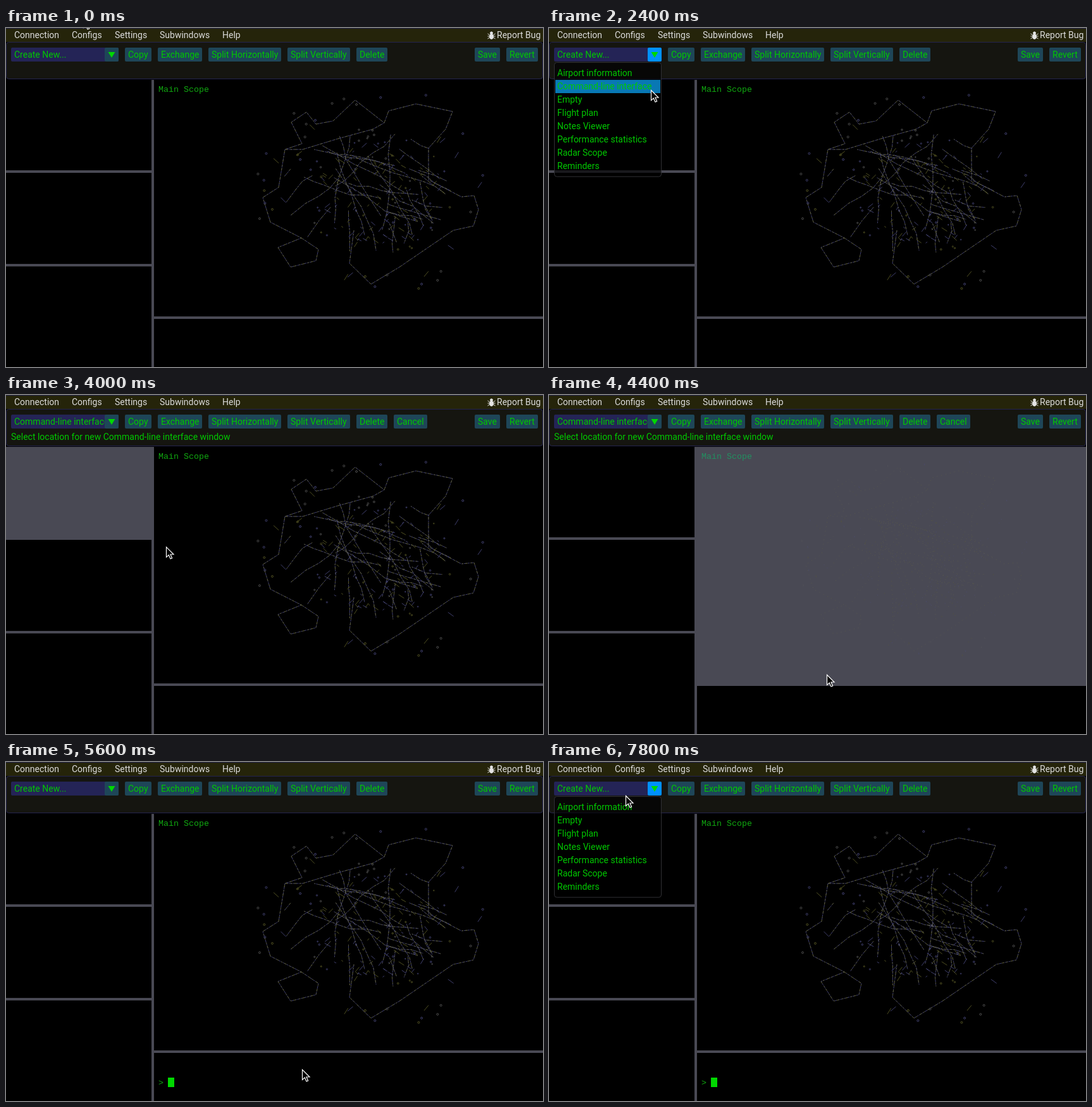
These frames come from a looping animation (849x536 px, 8000 ms). An HTML page:

```html
<!DOCTYPE html>
<html lang="en">
<head>
<meta charset="utf-8">
<title>Subwindow editor</title>
<style>
html, body { margin: 0; width: 100%; height: 100%; overflow: hidden; background: #000; }
svg { display: block; width: 100%; height: 100%; }
text { font: 14px Roboto, sans-serif; fill: #00c800; white-space: pre; }
.menu { fill: #dcdcdc; }
.mono { font: 13.33px "Liberation Mono", monospace; fill: #10a810; }
.map * { fill: none; stroke-width: 0.8; }
.lit .map { opacity: 0.7; }
.lit .map * { stroke-dasharray: 1 6; }
.lit .mono { fill: #229060; }
</style>
</head>
<body>
<svg id="stage" viewBox="0 0 849 536" preserveAspectRatio="none"></svg>
<script>
const NS = 'http://www.w3.org/2000/svg';
const stage = document.getElementById('stage');
const LOOP = 8000, STEP = 200;
const GREY = '#494954', NAVY = '#242456', TEAL = '#1e4658', SKY = '#0090ff', GREEN = '#00d800';
const OLIVE = '#62622a', BLUE = '#505088';

function el(parent, tag, attrs = {}, text) {
  const node = document.createElementNS(NS, tag);
  for (const key in attrs) node.setAttribute(key, attrs[key]);
  if (text !== undefined) node.textContent = text;
  parent.appendChild(node);
  return node;
}
const group = (parent = stage, cls = '') => el(parent, 'g', { class: cls });
const rect = (parent, x, y, width, height, fill, rx = 0) =>
  el(parent, 'rect', { x, y, width, height, fill, rx });
const label = (parent, x, y, text, cls = '') => el(parent, 'text', { x, y, class: cls }, text);
const widthOf = node => Math.round(node.getComputedTextLength());
const show = (node, on) => node.setAttribute('visibility', on ? 'visible' : 'hidden');

function random(seed) {
  return () => (seed = (seed * 16807) % 2147483647) / 2147483647;
}

// Panes
const LEFT = 230, TOP = 82, BAR = 4;
rect(stage, LEFT, TOP, BAR, 454, GREY);
for (const y of [225, 373]) rect(stage, 0, y, LEFT, BAR, GREY);
rect(stage, LEFT, 456, 619, BAR, GREY);

const hover = {
  left: rect(stage, 0, TOP, LEFT + BAR, 147, GREY),
  scope: rect(stage, LEFT, TOP, 619, 378, GREY),
  bottom: rect(stage, LEFT, 456, 619, 80, GREY)
};

// Radar map: a few borders, the rest scattered by rule
const scope = group();
const map = group(scope, 'map');
const rnd = random(4711);
const between = (a, b) => a + rnd() * (b - a);
const pick = list => list[Math.floor(rnd() * list.length)];

function trace(points) {
  const shift = between(0, 20);
  el(map, 'polyline', { points, stroke: BLUE, 'stroke-dasharray': '5 1 3 1', 'stroke-dashoffset': shift });
  el(map, 'polyline', { points, stroke: OLIVE, 'stroke-dasharray': '4 5 2 3', 'stroke-dashoffset': shift });
}
[
  'M475,133 451,149 468,183 441,192 431,252 406,268 418,307 467,332 430,347 450,378 490,368 494,350 467,332',
  '441,192 469,192 525,175 580,160 598,150 552,114 517,147 490,152 475,133',
  '598,150 605,131 648,120 706,132 695,160 668,190 668,240 720,267 740,265 747,287 739,313 707,320 622,378 577,405 543,372 550,320'
].forEach(points => trace(points.replace('M', '')));

const inside = (x, y) => Math.hypot((x - 570) / 135, (y - 260) / 105) < 1;

// Routes keep their heading with small kinks until they leave the area
function route(x, y, heading) {
  const points = [];
  for (let i = 0; i < 7 && inside(x, y); i++) {
    points.push(`${x.toFixed(1)},${y.toFixed(1)}`);
    const len = between(14, 32), dir = heading + between(-0.25, 0.25);
    x += Math.cos(dir) * len;
    y += Math.sin(dir) * len;
  }
  if (points.length > 1) trace(points.join(' '));
}
const headings = [0.2, 0.5, 1.2, 1.7, 2.4];
for (let i = 0; i < 42; i++) route(between(440, 670), between(160, 310), headings[i % 5]);

function dash(x, y, len) {
  const dir = pick([0.5, 2.1]) + between(0, 0.4);
  el(map, 'line', {
    x1: x, y1: y, x2: x + Math.cos(dir) * len, y2: y + Math.sin(dir) * len, stroke: pick([OLIVE, BLUE])
  });
}
const fix = (cx, cy, r) => el(map, 'circle', { cx, cy, r, stroke: pick([OLIVE, BLUE, '#606060']) });

function scatter(count, near, far, put) {
  for (let i = 0; i < count; i++) {
    const a = between(0, 2 * Math.PI), r = Math.sqrt(between(near * near, far * far));
    put(590 + Math.cos(a) * r * 100, 260 + Math.sin(a) * r * 86);
  }
}
scatter(110, 0, 1, (x, y) => dash(x, y, between(3, 11)));
scatter(12, 1.2, 1.8, (x, y) => dash(x, y, 11));
scatter(50, 0, 1.2, (x, y) => fix(x, y, between(0.7, 1.4)));
scatter(28, 1.2, 2, (x, y) => fix(x, y, 1.5));

label(scope, 241, 101, 'Main Scope', 'mono');

// Command line
const cli = group();
label(cli, 241, 511, '>', 'mono');
rect(cli, 256, 499, 10, 15, GREEN);

// Menu bar
rect(stage, 0, 0, 849, 22, '#25240a');
rect(stage, 0, 0, 849, 1, '#202044');
let menuX = 13;
for (const text of ['Connection', 'Configs', 'Settings', 'Subwindows', 'Help'])
  menuX += widthOf(label(stage, menuX, 16, text, 'menu')) + 20;
label(stage, 776, 16, 'Report Bug', 'menu');

const bug = el(stage, 'g', { transform: 'translate(767.5 12)', stroke: '#e4e4e4', fill: '#e4e4e4' });
el(bug, 'ellipse', { cy: 1.5, rx: 3, ry: 4 });
el(bug, 'circle', { cy: -4, r: 2 });
for (const side of [-1, 1])
  for (const slope of [-1, 0, 1])
    el(bug, 'line', { x1: side * 3, y1: 1 + slope * 2, x2: side * 6, y2: 1 + slope * 4 });

// Toolbar
el(stage, 'rect', { x: 0.5, y: 22.5, width: 848, height: 58, rx: 4, fill: '#151510', stroke: '#24244e' });
rect(stage, 8, 31, 170, 22, NAVY, 2);
const arrowBox = rect(stage, 156, 31, 22, 22, TEAL, 2);
el(stage, 'path', { d: 'M161.5 38H172.5L167 47Z', fill: GREEN });
const clip = el(el(stage, 'defs'), 'clipPath', { id: 'preview' });
rect(clip, 8, 31, 148, 22, '#fff');
const preview = label(stage, 13, 47, '');
preview.setAttribute('clip-path', 'url(#preview)');

// Adds a button and returns where the next one starts
function button(parent, x, text) {
  const box = rect(parent, x, 31, 0, 22, TEAL, 2);
  const width = widthOf(label(parent, x + 5, 47, text)) + 10;
  box.setAttribute('width', width);
  return x + width + 10;
}
const row = (parent, x, names) => names.reduce((at, name) => button(parent, at, name), x);
const nextX = row(stage, 188, ['Copy', 'Exchange', 'Split Horizontally', 'Split Vertically', 'Delete']);
row(stage, 741, ['Save', 'Revert']);

const placing = group();
button(placing, nextX, 'Cancel');
label(placing, 8, 71, 'Select location for new Command-line interface window');

// Drop-down list
const CLI = 'Command-line interface';
const kinds = ['Airport information', CLI, 'Empty', 'Flight plan', 'Notes Viewer',
  'Performance statistics', 'Radar Scope', 'Reminders'];
const ROW = 21, LIST_TOP = 61;

function dropdown(items) {
  const g = group();
  el(g, 'rect', {
    x: 8.5, y: 54.5, width: 169, height: items.length * ROW + 12.5, rx: 4,
    fill: '#000', 'fill-opacity': 0.65, stroke: '#303034'
  });
  const mark = rect(g, 10, 0, 166, ROW, '#0878b4');
  items.forEach((text, i) => label(g, 13, LIST_TOP + 15 + i * ROW, text));
  return { g, mark, count: items.length };
}
const fullList = dropdown(kinds);
const shortList = dropdown(kinds.filter(k => k !== CLI));

function drawList(list, open, x, y) {
  const i = Math.floor((y - LIST_TOP) / ROW);
  const over = open && x >= 9 && x < 177 && i >= 0 && i < list.count;
  show(list.g, open);
  show(list.mark, over);
  if (over) list.mark.setAttribute('y', LIST_TOP + i * ROW);
}

// Pointer: each move is start, end, x, y
const pointer = el(stage, 'path', {
  d: 'M.5 .5V16.5L4.3 13L7 19L9.6 18L7 12H12Z', fill: '#000', stroke: '#fff', 'stroke-width': 1.2
});
const moves = [
  [0, 1200, 92, 36], [1600, 2400, 161, 98], [3400, 4000, 253, 240], [4000, 4400, 439, 442],
  [4400, 4600, 468, 486], [5600, 7200, 95, 41], [7400, 7800, 121, 53]
];
function pointerAt(t) {
  let x = 122, y = -17;
  for (const [from, to, toX, toY] of moves) {
    const f = Math.min(1, Math.max(0, (t - from) / (to - from)));
    x += (toX - x) * f;
    y += (toY - y) * f;
  }
  return [Math.round(x), Math.round(y)];
}

function draw(ms) {
  const t = Math.floor((ms % LOOP) / STEP) * STEP;
  const within = (a, b) => t >= a && t < b;
  const [x, y] = pointerAt(t);
  const first = within(1400, 2800), second = t >= 7400;
  const choosing = within(2800, 5000), lit = within(4200, 4600);
  const onCombo = x >= 8 && x < 178 && y >= 31 && y < 53;

  show(hover.left, within(2800, 4200));
  show(hover.scope, lit);
  show(hover.bottom, within(4600, 5000));
  scope.classList.toggle('lit', lit);
  show(cli, t >= 5000);
  show(placing, choosing);
  preview.textContent = choosing ? CLI : 'Create New...';
  arrowBox.setAttribute('fill', first || second || onCombo ? SKY : TEAL);
  drawList(fullList, first, x, y);
  drawList(shortList, second, x, y);
  pointer.setAttribute('transform', `translate(${x} ${y})`);
}

let start;
function tick(now) {
  start ??= now;
  draw(now - start);
  requestAnimationFrame(tick);
}
draw(0);
requestAnimationFrame(tick);
</script>
</body>
</html>
```
